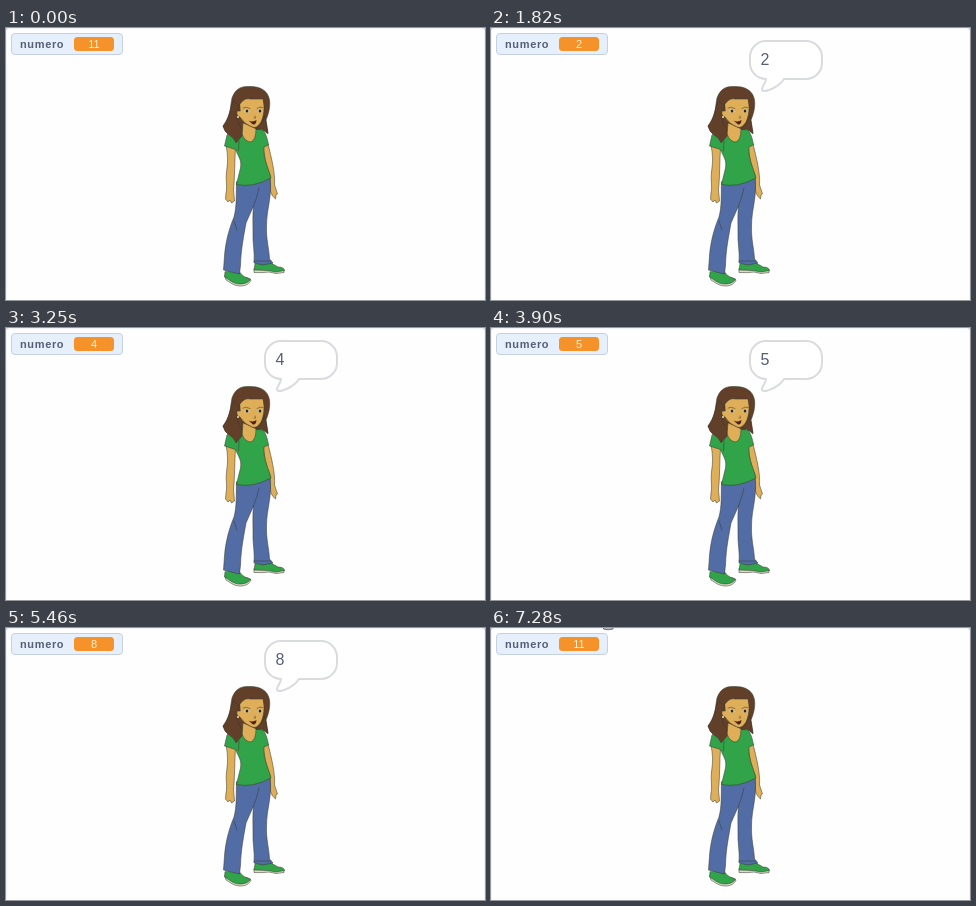
Recreate the animation shown at these times as an HTML page. Size 479 by 272 pixels, loop 7410 ms.

```html
<!DOCTYPE html>
<html lang="es">
<head>
<meta charset="utf-8">
<title>numero</title>
<style>
html, body { margin: 0; width: 100%; height: 100%; overflow: hidden; background: #fefefe; }
svg { display: block; width: 100%; height: 100%; }
text { font-family: "Liberation Sans", Arial, sans-serif; }
.ink { stroke: #3b3d31; stroke-width: .55; stroke-linejoin: round; stroke-linecap: round; }
.skin { fill: #dfae58; }
.hair { fill: #613f29; }
.shirt { fill: #31a349; }
.jeans { fill: #526ca5; }
.line { fill: none; }
</style>
</head>
<body>
<svg viewBox="0 0 479 272">
  <rect width="479" height="272" fill="#fefefe"/>
  <path d="M.5 272V5Q.5 .5 5 .5H474Q478.500 .5 478.500 5V272" fill="none" stroke="#f0f3f8"/>
  <path d="M0 0H4Q0 0 0 4ZM479 0H475Q479 0 479 4Z" fill="#cbd5e3"/>

  <g id="monitor">
    <rect x="5.500" y="5.500" width="111" height="21" rx="3.500" fill="#e5f0fc" stroke="#c5d1df"/>
    <text x="14" y="20" font-size="11" letter-spacing=".65" font-weight="bold" fill="#575e75">numero</text>
    <rect x="68" y="9" width="40" height="14" rx="3.500" fill="#f5922a"/>
    <text id="value" x="88" y="20" font-size="11" text-anchor="middle" fill="#fff3dc"></text>
  </g>

  <g id="girl">
    <!-- back hair -->
    <path class="ink hair" d="M226 70C229 61 235 58 243 58.500C253 58 262 62 263.500 72C264.500 80 262 87 260 92L262 105L256 101L249 104L239 110L230 116C228 109 223 107 220 104L217 98C222 93 224 85 225 76Z"/>
    <!-- arms -->
    <path class="ink skin" d="M220 117C222 127 222 134 220.500 144C219.500 153 221.500 158 220 165L219.500 171L222 174L224 172L225.500 175L228.500 173L227.500 162C229 147 228.500 133 229.500 120Z"/>
    <path class="ink skin" d="M257 117C258 127 260 138 264 147L264.500 160C264 164 266 168 269.500 171L270 167L271.500 166L268.500 157C269.500 146 265.500 130 262 116Z"/>
    <!-- shoes -->
    <path class="ink" fill="#d8ddc9" d="M219 248L220 252C225 255 228 258 235 258C240 258 244 255 245 252L242 250Z"/>
    <path class="ink shirt" d="M219 244L218.500 249C224 252 227 256 234 256C239 256 243 254 244.500 251C240 250 236 248 233 243Z"/>
    <path class="ink" fill="#d8ddc9" d="M248 241V244.500Q256 245 263 244L270 245.500L278 244.500V242Z"/>
    <path class="ink shirt" d="M249 236L248 242L262 242.500L270 244L278.500 242.500Q278 239 272 239L265 235Z"/>
    <!-- jeans -->
    <path class="ink jeans" d="M230.500 154C230 166 231 178 228 189C223 201 219.500 214 218.500 228L217.500 242L225 244L233.500 246L234.500 237C235 220 238 207 240 195L247.500 178C246.500 187 247 195 247 205C246.500 215 249 224 248 235L257 237L267 235L263.500 231C263 220 260 211 260.500 198C260.500 181 266.500 168 264 150Z"/>
    <path class="ink line" d="M253 160Q251 170 247.500 178M228 193L231 202M248 233L265 233" stroke-width=".4"/>
    <!-- shirt and neck -->
    <path class="ink shirt" d="M221 107L218.500 118L229.500 121.500C232 128 236 132 234.500 140L230.500 156.500Q247 160 265 150C263 141 257 132 258 119L262.500 117Q261 107 257 102L248 101H236Z"/>
    <path class="ink skin" d="M237 95L236 106Q239 114 245 114Q250 112 250 101Z"/>
    <path class="ink line" d="M233 113L232.500 123" stroke-width=".4"/>
    <!-- side locks -->
    <path class="ink hair" d="M233 78C229 88 231 95 236 101L236 108L230 115C228 109 222 107 219 103L217 98C223 90 224 82 227 73Z"/>
    <path class="ink hair" d="M258 87C258 94 254 97 250 101L256 101L262 106L260 94Z"/>
    <!-- face -->
    <path class="ink skin" d="M234 76C237 72 240 70 244 71L257 71C259 79 258 88 255 94Q251 101 246 99Q238 96 234 89Q230 88 231 83L234 83Z"/>
    <path class="hair" d="M234 76C237 70 244 66 257 71L258 77Q262 69 257 64L244 62Q235 65 234 76Z"/>
    <path class="ink line" d="M237 80Q240 78 244 80.500M251 80.500Q254 78 257 79.500M249 88L249.500 90L248 90"/>
    <g fill="#eee5cd"><ellipse cx="241" cy="83" rx="2.600" ry="1.600"/><ellipse cx="254" cy="83" rx="2.400" ry="1.600"/></g>
    <g fill="#292922"><circle cx="241" cy="83" r="1.500"/><circle cx="254" cy="83" r="1.500"/></g>
    <path fill="#4f211c" d="M242.500 92.500Q247 94.500 250.500 92Q250 97 247 96.500Z"/>
    <circle cx="232" cy="89" r="1" fill="#eee0b8"/>
  </g>

  <g id="bubble">
    <path d="M275 13H315A16 16 0 0 1 331 29V35A16 16 0 0 1 315 51H293C288 59 277 63 273 63Q271 63 271 61C271 58 275 55 275 51A16 16 0 0 1 259 35V29A16 16 0 0 1 275 13Z" fill="#fff" stroke="#d9dbdf" stroke-width="2"/>
    <text id="speech" x="269.500" y="37" font-size="16" fill="#575e75"></text>
  </g>
  <path id="pointer" d="M112.500 0V1Q117 2.500 122 1V0" fill="#b9bec6" stroke="#686d76"/>
</svg>
<script>
const LOOP = 7410, START = 520, STEP = 590, LAST = 11;
const [value, speech, bubble, pointer] =
  ["value", "speech", "bubble", "pointer"].map(id => document.getElementById(id));
const show = (el, on) => el.setAttribute("visibility", on ? "visible" : "hidden");

function draw(t) {
  const count = Math.floor((t - START) / STEP);
  const talking = count >= 0 && count < LAST;
  value.textContent = talking ? count : LAST;
  speech.textContent = talking ? count : "";
  show(bubble, talking);
  show(pointer, t >= 7150);
}

const begin = performance.now();
function tick() {
  draw((performance.now() - begin) % LOOP);
  requestAnimationFrame(tick);
}
tick();
</script>
</body>
</html>
```
